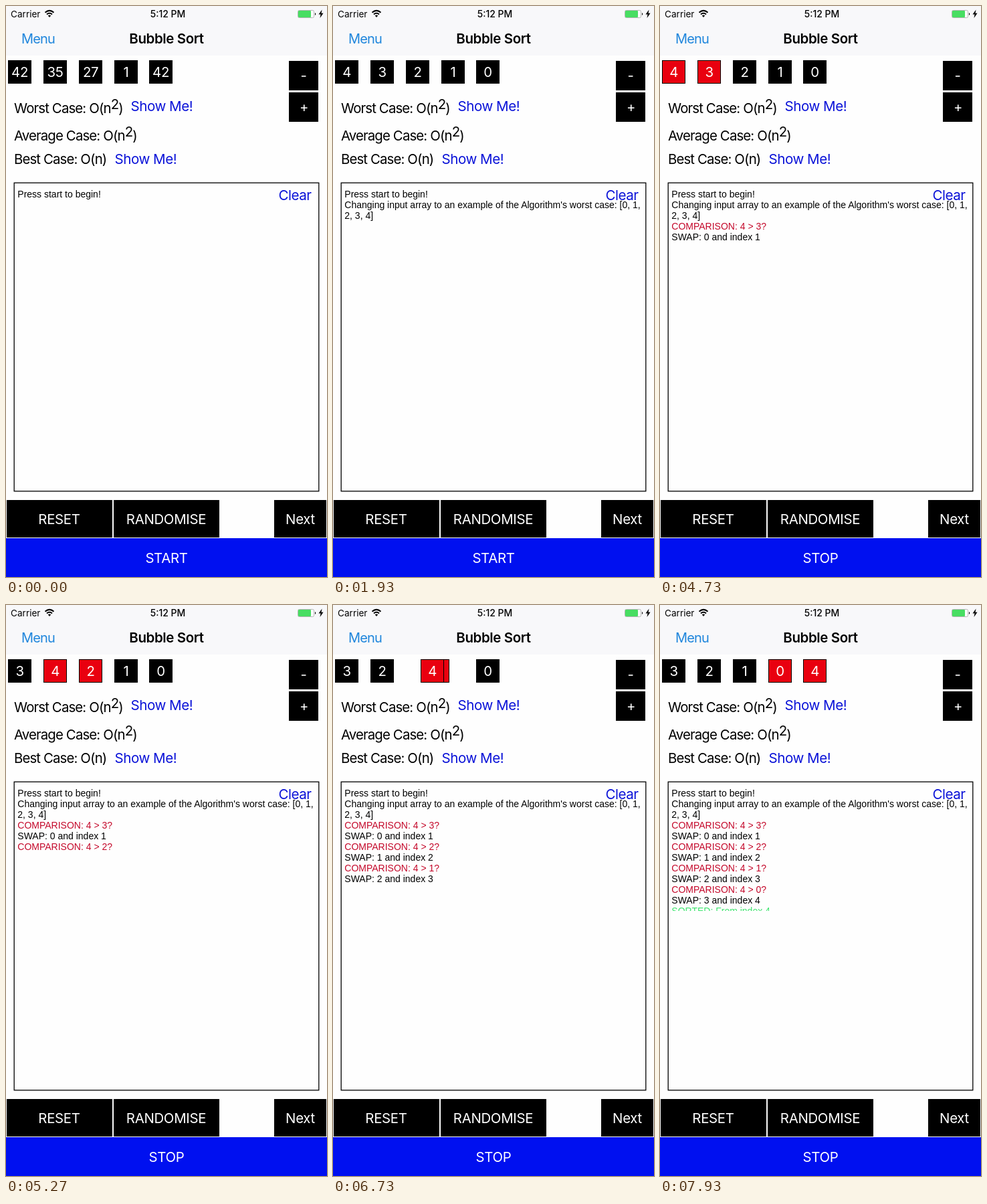
These frames come from a looping animation (480x853 px, 8 s). An HTML page:

```html
<!DOCTYPE html>
<html lang="en">
<head>
<meta charset="utf-8">
<title>Bubble Sort</title>
<style>
  html, body { margin: 0; width: 100%; height: 100%; overflow: hidden; background: #fefefe; }
  svg { display: block; width: 100%; height: 100%; }
  text { font: 20.4px Inter, sans-serif; letter-spacing: -.043em; white-space: pre; }
  .mid { text-anchor: middle; }
  .white { fill: #fff; letter-spacing: -.015em; }
  .link { fill: #0b13d8; font-size: 20.6px; letter-spacing: -.024em; }
  .menu { fill: #1f86dc; font-size: 20px; }
  .title { font-weight: 600; font-size: 20.5px; letter-spacing: -.02em; }
  .status { font-size: 13.6px; letter-spacing: 0; }
  .clock { font-weight: 500; font-size: 14px; letter-spacing: 0; }
  .log text { font: 14px "Liberation Sans", Arial, sans-serif; letter-spacing: 0; }
</style>
</head>
<body>
<svg id="stage" viewBox="0 0 480 853">
  <rect width="480" height="853" fill="#fefefe"/>
  <rect width="480" height="74" fill="#f8f8fa"/>
  <text class="status" x="7" y="17">Carrier</text>
  <path d="M58.5 9.8Q65 4 71.5 9.8M61 12.6Q65 9 69 12.6" fill="none" stroke="#000" stroke-width="2"/>
  <path d="M62.8 14.3Q65 12.6 67.2 14.3L65 17Z"/>
  <text class="clock mid" x="242" y="17">5:12 PM</text>
  <rect x="436.5" y="6.5" width="24" height="11" rx="2" fill="#fff" stroke="#b5b5b5"/>
  <rect x="437" y="7" width="19" height="10" rx="1" fill="#48de62"/>
  <path d="M462 10q2.5 2 0 4z"/>
  <path d="M472.5 5.5L467.5 12.5H470.5L469.5 18L474.5 10.8H471.5Z"/>
  <text class="menu" x="23" y="56">Menu</text>
  <text class="title mid" x="240" y="56">Bubble Sort</text>

  <g id="tiles"></g>
  <path d="M423 82h44v44h-44zM423 129h44v44h-44z"/>
  <text class="white mid" x="445" y="111">-</text>
  <text class="white mid" x="445.5" y="158">+</text>

  <text x="12" y="160">Worst Case: O(n<tspan dy="-6">2</tspan><tspan dy="6">)</tspan></text>
  <text x="12" y="201">Average Case: O(n<tspan dy="-6">2</tspan><tspan dy="6">)</tspan></text>
  <text x="12" y="236">Best Case: O(n)</text>
  <text class="link" id="showWorst" x="186.5" y="156.5">Show Me!</text>
  <text class="link" x="162.5" y="235.5">Show Me!</text>

  <rect x="12.2" y="264.2" width="455.6" height="460.6" fill="#fefefe" stroke="#000" stroke-width="1.3"/>
  <clipPath id="reveal"><rect id="revealBox" x="13" y="270" width="454" height="19"/></clipPath>
  <g class="log" id="log" clip-path="url(#reveal)"></g>
  <text class="link" x="407.5" y="290">Clear</text>

  <path d="M1 738h158v56H1zM161 738h158v56H161zM401 738h78v56h-78z"/>
  <text class="white mid" x="79.5" y="773.5">RESET</text>
  <text class="white mid" x="239.5" y="773.5">RANDOMISE</text>
  <text class="white mid" x="440" y="773.5">Next</text>
  <rect y="795" width="480" height="58" fill="#0010f0"/>
  <text class="white mid" id="toggle" x="240" y="832">START</text>
</svg>
<script>
const LOOP = 8000;
const LOAD = 1270, TOGGLE = 3870;
const FIRST = 4100, PERIOD = 933, SWAP_LOG = 300, SWAP_AT = 630, SWAP_TIME = 300;
const REVEAL = 200, LINE = 16;
const INITIAL = [42, 35, 27, 1, 42], WORST = [4, 3, 2, 1, 0];
const RED = '#e9000f';

const $ = id => document.getElementById(id);
const clamp = v => Math.max(0, Math.min(1, v));
const ease = v => v * v * (3 - 2 * v);
const slotX = i => Math.round(3.4 + i * 52.7);

function add(parent, tag, attrs, text = '') {
  const el = document.createElementNS('http://www.w3.org/2000/svg', tag);
  for (const key in attrs) el.setAttribute(key, attrs[key]);
  el.textContent = text;
  return parent.appendChild(el);
}

// The largest value comes last so that it slides over the others.
const tiles = [4, 3, 2, 1, 0].map(slot => {
  const g = add($('tiles'), 'g', {});
  const box = add(g, 'rect', { x: .5, y: 81.5, width: 34, height: 34, stroke: '#000' });
  const label = add(g, 'text', { class: 'white mid', x: 17.6, y: 106 });
  return { slot, g, box, label };
});

const log = [
  { at: -REVEAL, text: 'Press start to begin!' },
  { at: LOAD, text: 'Changing input array to an example of the Algorithm\'s worst case: [0, 1,' },
  { at: LOAD, text: '2, 3, 4]' }
];
for (let i = 0; i < 4; i++) {
  const at = FIRST + i * PERIOD;
  log.push({ at, text: `COMPARISON: 4 > ${3 - i}?`, color: '#c4082a' });
  log.push({ at: at + SWAP_LOG, text: `SWAP: ${i} and index ${i + 1}` });
}
log.push({ at: FIRST + 4 * PERIOD, text: 'SORTED: From index 4', color: '#3be46c' });
log.forEach((line, i) => {
  line.el = add($('log'), 'text', { x: 17.3, y: 285.5 + i * LINE, fill: line.color || '#000' }, line.text);
});

// Button label: dims while held, then recovers.
function pressed(t, down, up) {
  const dim = ease(clamp((t - down) / 130)) * (1 - ease(clamp((t - up) / 300)));
  return 1 - .8 * dim;
}

function drawTiles(t) {
  const step = t < FIRST ? -1 : Math.min(3, Math.floor((t - FIRST) / PERIOD));
  const swapped = i => ease(clamp((t - FIRST - i * PERIOD - SWAP_AT) / SWAP_TIME));
  const travelled = [0, 1, 2, 3].reduce((sum, i) => sum + swapped(i), 0);
  for (const { slot, g, box, label } of tiles) {
    const pos = slot ? slot - swapped(slot - 1) : travelled;
    const active = step >= 0 && (slot === 0 || slot === step + 1);
    g.setAttribute('transform', `translate(${slotX(pos)})`);
    box.setAttribute('fill', active ? RED : '#000');
    label.textContent = (t < LOAD ? INITIAL : WORST)[slot];
  }
}

function drawLog(t) {
  let height = 3;
  for (const { at, el } of log) {
    el.style.display = t >= at ? '' : 'none';
    height += LINE * ease(clamp((t - at) / REVEAL));
  }
  $('revealBox').setAttribute('height', height);
}

function draw(now) {
  const t = now % LOOP;
  drawTiles(t);
  drawLog(t);
  $('showWorst').setAttribute('opacity', pressed(t, 870, LOAD));
  $('toggle').textContent = t < TOGGLE ? 'START' : 'STOP';
  $('toggle').setAttribute('opacity', pressed(t, 3600, TOGGLE));
}

const start = performance.now();
function frame() {
  draw(performance.now() - start);
  requestAnimationFrame(frame);
}
frame();
</script>
</body>
</html>
```
